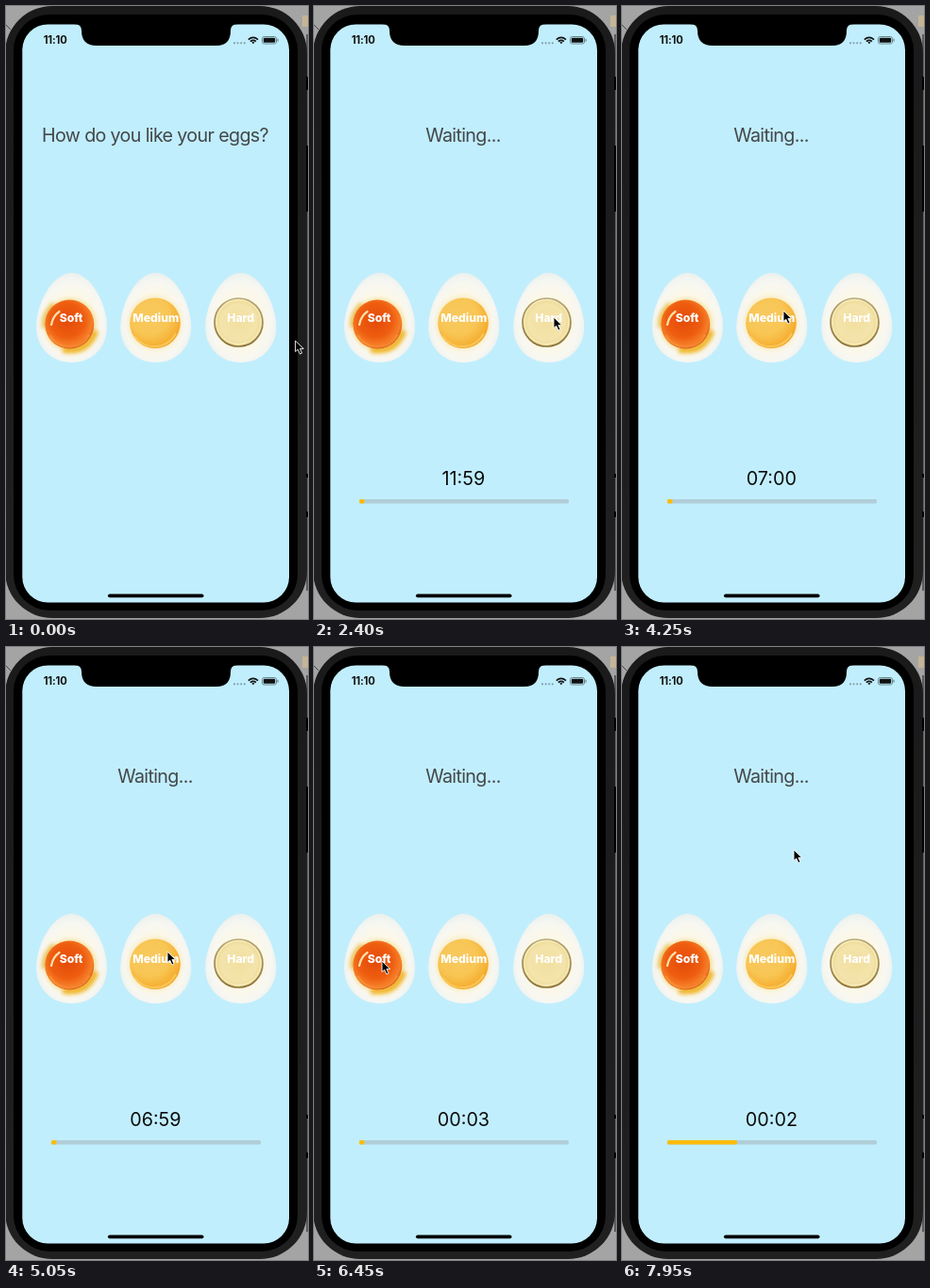
Recreate the animation shown at these times as an HTML page. Size 320x650 px, loop 8 s.

```html
<!DOCTYPE html>
<html lang="en">
<head>
<meta charset="utf-8">
<title>Egg timer</title>
<style>
  html, body { margin: 0; width: 100%; height: 100%; overflow: hidden; background: #a4a4a4; }
  svg { display: block; }
  text { font-family: Inter, Roboto, sans-serif; text-anchor: middle; }
  .label { font-size: 12.2px; font-weight: 800; fill: #fff; }
  #title { font-size: 19.7px; letter-spacing: -.65px; fill: #444749; }
  #clock { font-size: 19.8px; fill: #0b0b0b; }
</style>
</head>
<body>
<svg width="320" height="650" viewBox="0 0 320 650">
  <defs>
    <radialGradient id="white" cy=".54" r=".55">
      <stop offset=".55" stop-color="#fcf8e8"/>
      <stop offset=".8" stop-color="#f7f7f2"/>
      <stop offset="1" stop-color="#eaf0ec"/>
    </radialGradient>
    <radialGradient id="softYolk" cx=".46" cy=".42" r=".58">
      <stop stop-color="#e44a08"/>
      <stop offset=".6" stop-color="#ee5d10"/>
      <stop offset=".88" stop-color="#f6802a"/>
      <stop offset="1" stop-color="#dd5c16"/>
    </radialGradient>
    <radialGradient id="mediumYolk" cx=".4" cy=".36" r=".68">
      <stop stop-color="#f7c95f"/>
      <stop offset=".55" stop-color="#f8c654"/>
      <stop offset=".85" stop-color="#f6b135"/>
      <stop offset="1" stop-color="#f2a024"/>
    </radialGradient>
    <radialGradient id="hardYolk">
      <stop stop-color="#f2dfa0"/>
      <stop offset=".75" stop-color="#f4e4ab"/>
      <stop offset="1" stop-color="#ead790"/>
    </radialGradient>
    <linearGradient id="hardRim" x2="0" y2="1">
      <stop stop-color="#b7a878"/>
      <stop offset="1" stop-color="#8b7238"/>
    </linearGradient>
    <linearGradient id="phone" x2="0" y2="1">
      <stop stop-color="#1a1a1b"/>
      <stop offset="1" stop-color="#202021"/>
    </linearGradient>
    <filter id="blur" x="-50%" y="-50%" width="200%" height="200%"><feGaussianBlur stdDeviation="2.2"/></filter>
    <path id="egg" fill="url(#white)" d="M0-47.5C20-47.5 37.5-15 37.5 10C37.5 33 20 47.5 0 47.5S-37.5 33-37.5 10C-37.5-15-20-47.5 0-47.5Z"/>
  </defs>

  <!-- Phone -->
  <path d="M318 30h2v590h-2z" fill="#5c5c5c"/>
  <path d="M314 10h6v12h-6z" fill="#c5b596"/>
  <path d="M0 20l5 5" stroke="#444"/>
  <rect x="-1" y="0" width="320" height="649" rx="50" fill="url(#phone)"/>
  <path d="M318 75h2v14h-2zM318 148h2v70h-2zM318 496h2v4h-2zM318 536h2v6h-2z" fill="#000"/>
  <rect x="8" y="9" width="301" height="632" rx="38" fill="#000"/>
  <rect x="17.3" y="19.500" width="282.700" height="613" rx="27" fill="#c1eefd"/>
  <path d="M72 19q8 0 8 7q0 16 16 16h127q15 0 15-16q0-7 8-7z" fill="#000"/>

  <!-- Status bar -->
  <text x="52.2" y="40.2" font-size="11.2" font-weight="700" letter-spacing="-.15" fill="#111">11:10</text>
  <path d="M242 39.3h12" stroke="#819fa9" stroke-width="2.2" stroke-linecap="round" stroke-dasharray="0 3.6"/>
  <g fill="none" stroke="#111" stroke-width="1.7">
    <path d="M256.8 35.6q5-4.4 10.2 0M258.9 37.7q3-2.5 6 0"/>
    <path d="M261.9 40.2l-1.6-1.6q1.6-1.2 3.2 0z" fill="#111" stroke="none"/>
    <rect x="271.5" y="32.5" width="15" height="7.5" rx="2" stroke="#698891" stroke-width="1"/>
  </g>
  <rect x="272.8" y="33.8" width="12.4" height="5" rx="1" fill="#111"/>
  <path d="M288 34.8v3" stroke="#698891" stroke-width="1.2"/>

  <text id="title" x="158" y="143.5"></text>

  <!-- Eggs -->
  <use href="#egg" x="69.5" y="330.5"/>
  <g filter="url(#blur)" fill="none">
    <circle cx="68" cy="338" r="28" fill="#f6dd92" opacity=".85"/>
    <path d="M41 341q-2-14 10-25" stroke="#e8bd45" stroke-width="5"/>
    <path d="M60 364q26 5 35-20" stroke="#f0b526" stroke-width="7"/>
  </g>
  <circle cx="67.3" cy="337.5" r="26" fill="url(#softYolk)"/>
  <path d="M46.5 349q7 13 22 12.500q14-1 20-13" fill="none" stroke="#fb9a3c" stroke-width="2" opacity=".6"/>
  <path d="M48 338q1.500-9 8.500-14" fill="none" stroke="#ffe0a8" stroke-width="2.2" stroke-linecap="round"/>

  <use href="#egg" x="158.7" y="330.5"/>
  <circle cx="157.7" cy="336" r="29" fill="#f8e6b2" opacity=".6" filter="url(#blur)"/>
  <circle cx="158" cy="336.3" r="26.8" fill="url(#mediumYolk)"/>
  <path d="M136 350q9 12 23 11q14-1 21-14" fill="none" stroke="#fbcf62" stroke-width="2" opacity=".8"/>

  <use href="#egg" x="248.7" y="330.5"/>
  <circle cx="246.5" cy="335.5" r="25.500" fill="url(#hardYolk)" stroke="url(#hardRim)" stroke-width="1.7"/>
  <circle cx="246.5" cy="335" r="23.500" fill="none" stroke="#f9efc4" stroke-width="1.3" opacity=".8"/>

  <text class="label" x="69" y="335">Soft</text>
  <text class="label" x="158.8" y="335">Medium</text>
  <text class="label" x="248.7" y="335">Hard</text>

  <!-- Countdown -->
  <text id="clock" x="158.4" y="508"></text>
  <g id="bar">
    <rect x="48" y="523" width="222" height="4.500" rx="1.5" fill="#b1ced8"/>
    <rect id="fill" x="48" y="523" height="4.500" rx="1.5" fill="#fdbb0c"/>
  </g>

  <rect x="108" y="623.500" width="101.500" height="3.700" rx="1.85" fill="#000"/>
  <path id="cursor" d="M0 0V11.500L2.700 9.200L4.900 14L7 13L4.900 8.400H8.700Z" fill="#000" stroke="#fff" stroke-width=".9" stroke-linejoin="round"/>
</svg>
<script>
const LOOP = 8000;
const BAR_WIDTH = 222, MIN_FILL = 5.5;
const $ = id => document.getElementById(id);
const [title, clock, bar, fill, cursor] = ['title', 'clock', 'bar', 'fill', 'cursor'].map($);

// Each tap starts a countdown of the given number of seconds.
const taps = [
  { at: 1050, seconds: 720 },
  { at: 4000, seconds: 420 },
  { at: 6400, seconds: 3 }
];

// Pointer stops: time, x, y
const stops = [
  [0, 306.6, 355], [150, 306.6, 355], [900, 254, 330], [2900, 254, 330],
  [3750, 171, 323], [5300, 171, 323], [6100, 72, 333], [6500, 72, 333],
  [7100, 120, 266], [7700, 182, 215], [LOOP, 182, 215]
];

const pad = n => String(n).padStart(2, '0');

function pointerAt(t) {
  const i = stops.findIndex(stop => stop[0] > t);
  const [t0, x0, y0] = stops[i - 1], [t1, x1, y1] = stops[i];
  const p = (t - t0) / (t1 - t0), eased = p * p * (3 - 2 * p);
  return [x0 + (x1 - x0) * eased, y0 + (y1 - y0) * eased];
}

function draw(t) {
  const tap = taps.filter(tap => tap.at <= t).pop();
  title.textContent = tap ? 'Waiting...' : 'How do you like your eggs?';
  clock.textContent = '';
  if (tap) {
    const passed = Math.floor((t - tap.at) / 1000);
    const left = tap.seconds - passed;
    clock.textContent = pad(Math.floor(left / 60)) + ':' + pad(left % 60);
    fill.setAttribute('width', Math.max(MIN_FILL, BAR_WIDTH * passed / tap.seconds));
  }
  // The bar first appears with the first tick.
  bar.style.display = t >= taps[0].at + 1000 ? '' : 'none';
  cursor.setAttribute('transform', `translate(${pointerAt(t)})`);
}

function frame() {
  draw(performance.now() % LOOP);
  requestAnimationFrame(frame);
}
frame();
</script>
</body>
</html>
```
